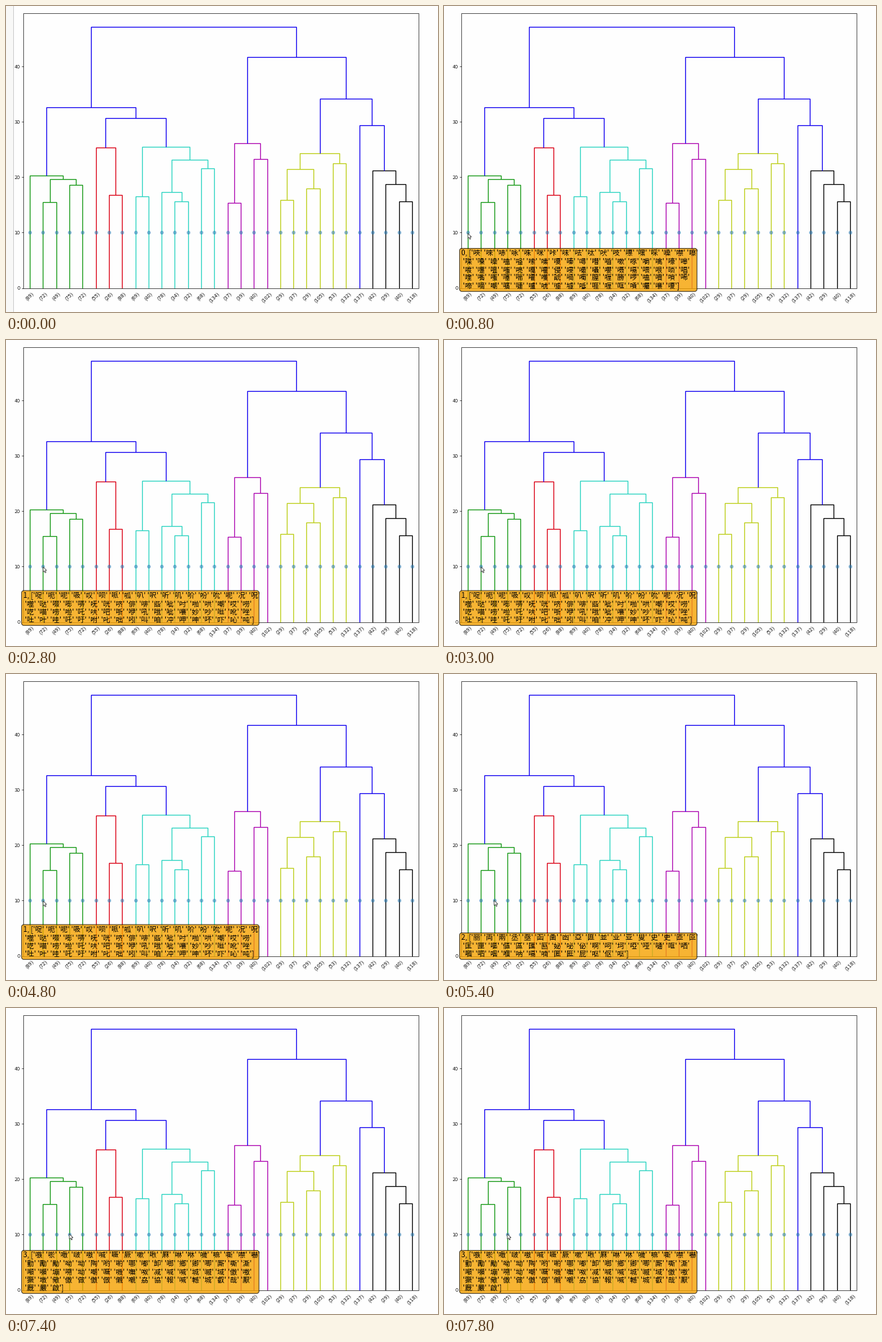
Recreate the animation shown at these times as a matplotlib script. Size 600x426 px, loop 8 s.

```python
from itertools import count

import matplotlib.pyplot as plt
import numpy as np
from matplotlib.animation import FuncAnimation
from matplotlib.patches import FancyBboxPatch, Polygon, Rectangle

W, H, DPI = 600, 426, 72          # at 72 dpi one point is one pixel
FRAME_MS, LOOP_MS = 200, 8000
LEFT, RIGHT, TOP, BOTTOM = 24, 573, 10.4, 392.55
UNIT = 7.71                       # pixels per unit of merge height
LEAVES = 30
STEP = (RIGHT - LEFT) / LEAVES

# A node is (merge height, left, right); a leaf is its cluster size.
TREE = (47.1,
        (32.6,
         (20.3, 89, (19.65, (15.45, 72, 49), (18.6, 75, 72))),
         (30.65,
          (25.3, 55, (16.8, 26, 88)),
          (25.5, (16.55, 69, 40),
           (23.2, (17.35, 78, (15.7, 34, 32)), (21.55, 68, 134))))),
        (41.65,
         (26.1, (15.4, 37, 39), (23.25, 40, 102)),
         (34.2,
          (24.3, (21.5, (15.9, 29, 37), (18, 29, 105)), (22.45, 53, 132)),
          (29.4, 137, (21.25, 42, (18.7, 29, (15.65, 40, 118)))))))
TRUNK = "#1a0af0"
TRUNK_MIN = 27                    # merges below this height start a cluster
CLUSTER_COLORS = iter(["#1f9d1f", "#dc0a1e", "#34d6c4",
                       "#b010b4", "#bfd022", "#101010"])

CLUSTERS = [
    "唊唻哧咏咮咪咔味呿呔吠吱嘌嘿啋噪噤嚓"
    "喋嗓噪嗑嗌嗦嗉嗄嗪噚噆嚙嗽啄嚼噙嚎嗥"
    "喥嚏嗢嗤喨嘎嚯侵唚嘬囁嚶嗫嗝喂哏唢唱"
    "喹嘴嗤噻喘嚯嚄諕喎噣膣喱勝啰嗑噴嗩唏"
    "啼嘀嘲嚝嗹嚧唬噓墟呧啀喱哐嗊囑嚷嗄",
    "哫呃呢吸叹呗哌呱叭呎听叽吤吩吮呢况呪"
    "噬哒啜嘭哢呒咣哜俳啡啙呲吋啪哄嘲哎唠"
    "呓喵唠啦吒呋吧哳咿吼哦呲嚷妙吵咝吪唑"
    "吐叶哇吒吁咐叱咄吲叫咱冲呷呻吥吓吣吨",
    "丽両兩丞亟函圅凼亞匪並业亚叟史吏匝叵"
    "匡匣嘔傴區匯匦妼咇佖啊呵坷啞哑嗵哐哂"
    "嘓呬咽嗰呐嗝喃匿匨屁呕伛呕",
    "嗾唹噉啵嗷喊噘厥嗽啾厤啉咻噦嘛嘶噤嚇"
    "勭勵勱呦坳陶哟喲哪嘟卸啷鄉卿唧厮嘶澌"
    "噸嚬塴嗍坳嘲噘嘰嘸呶减喊喊城嘁域傲嗷"
    "獗墩儆傲做傲倣儭嚫劦協報喊轗城叡哉厭"
    "厩嚴啟",
]
ROW_LEN, ROW_PITCH = 18, 11.5

# The pointer hops from leaf to leaf and rests on each one.
FIRST_MS, REST_MS, HOP_MS = 500, 2300, 300
ARROW = np.array([(0, 0), (0, 7), (1.6, 5.6), (2.8, 8.2),
                  (4, 7.6), (2.9, 5.2), (5, 5)])

fig = plt.figure(figsize=(W / DPI, H / DPI), dpi=DPI, facecolor="#fefefe")
ax = fig.add_axes([0, 0, 1, 1])
ax.set(xlim=(0, W), ylim=(H, 0))
ax.axis("off")
label = dict(family="DejaVu Sans", fontsize=6.5, color="#111111")
leaf_ids = count()


def leaf_x(i):
    return LEFT + STEP * (i + 0.5)


def height_y(h):
    return BOTTOM - UNIT * h


def draw_leaf(size):
    x = leaf_x(next(leaf_ids))
    ax.text(x, 397.2, f"({size})", rotation=45, ha="center", va="top", **label)
    return x, BOTTOM


def draw_tree(node, color=TRUNK):
    """Draw a subtree from left to right and return the position of its top."""
    if isinstance(node, int):
        return draw_leaf(node)
    height, left, right = node
    if color == TRUNK and height < TRUNK_MIN:
        color = next(CLUSTER_COLORS)
    (x0, y0), (x1, y1) = draw_tree(left, color), draw_tree(right, color)
    y = height_y(height)
    ax.plot([x0, x0, x1, x1], [y0, y, y, y1], color=color, lw=1.25,
            solid_joinstyle="miter", solid_capstyle="butt", zorder=2)
    return (x0 + x1) / 2, y


def draw_axes():
    ax.add_patch(Rectangle((LEFT, TOP), RIGHT - LEFT, BOTTOM - TOP,
                           fill=False, ec="#222222", lw=0.7, zorder=2.5))
    for value in range(0, 50, 10):
        y = height_y(value)
        ax.plot([LEFT - 2.5, LEFT], [y, y], color="#222222", lw=0.7)
        ax.text(LEFT - 4.5, y, str(value), ha="right", va="center_baseline",
                **label)


def tooltip_rows(index):
    chars = CLUSTERS[index]
    rows = [" ".join(f"'{c}'" for c in chars[k:k + ROW_LEN])
            for k in range(0, len(chars), ROW_LEN)]
    rows = [f"{index}, [{rows[0]}"] + [" " + row for row in rows[1:]]
    rows[-1] += "]"
    return rows


def pointer_tip(t):
    """Ease out over the last part of each rest period towards the next leaf."""
    stop, elapsed = divmod(t - FIRST_MS, REST_MS)
    u = max(0, (elapsed - REST_MS + HOP_MS) / HOP_MS)
    leaf = stop + 1 - (1 - u) ** 2
    return leaf_x(leaf), 316.5 - 0.6 * leaf


draw_axes()
draw_tree(TREE)
xs = leaf_x(np.arange(LEAVES))
ax.scatter(xs, np.full(LEAVES, height_y(10)), s=20, color="#1f77b4",
           alpha=0.5, lw=0.5, zorder=2.6)

strip = ax.add_patch(Rectangle((0, 0), 10, H, fc="#f8f8f7", ec="none", zorder=1))
strip_edge, = ax.plot([10, 10], [0, H], color="#cfcfcf", lw=1, zorder=1)
box = ax.add_patch(FancyBboxPatch((24.6, 340), 323.8, 54,
                                  boxstyle="round,pad=2.9,rounding_size=2.9",
                                  fc="#f6a200", ec="black", lw=0.9, alpha=0.8,
                                  zorder=3))
lines = [ax.text(24.2, 0, "", family="Noto Sans CJK JP", fontsize=9.9,
                 va="baseline", color="black", zorder=4) for _ in range(5)]
pointer = ax.add_patch(Polygon(ARROW, fc="white", ec="#222222", lw=0.65,
                               zorder=5))


def update(frame):
    t = frame * FRAME_MS
    for part in (strip, strip_edge):
        part.set_visible(t == 0)

    pointer.set_visible(t > FRAME_MS)
    pointer.set_xy(ARROW + pointer_tip(t))

    index = (t - FIRST_MS) // REST_MS
    rows = tooltip_rows(index) if index >= 0 else []
    box.set_visible(bool(rows))
    height = ROW_PITCH * len(rows) - 3.4
    box.set_y(394.4 - height)
    box.set_height(height)
    for k, line in enumerate(lines):
        line.set_text(rows[k] if k < len(rows) else "")
        line.set_y(393.5 - ROW_PITCH * (len(rows) - 1 - k))
    return [strip, strip_edge, box, pointer, *lines]


anim = FuncAnimation(fig, update, frames=LOOP_MS // FRAME_MS,
                     interval=FRAME_MS, repeat=True, repeat_delay=0, blit=False)
plt.show()
```
